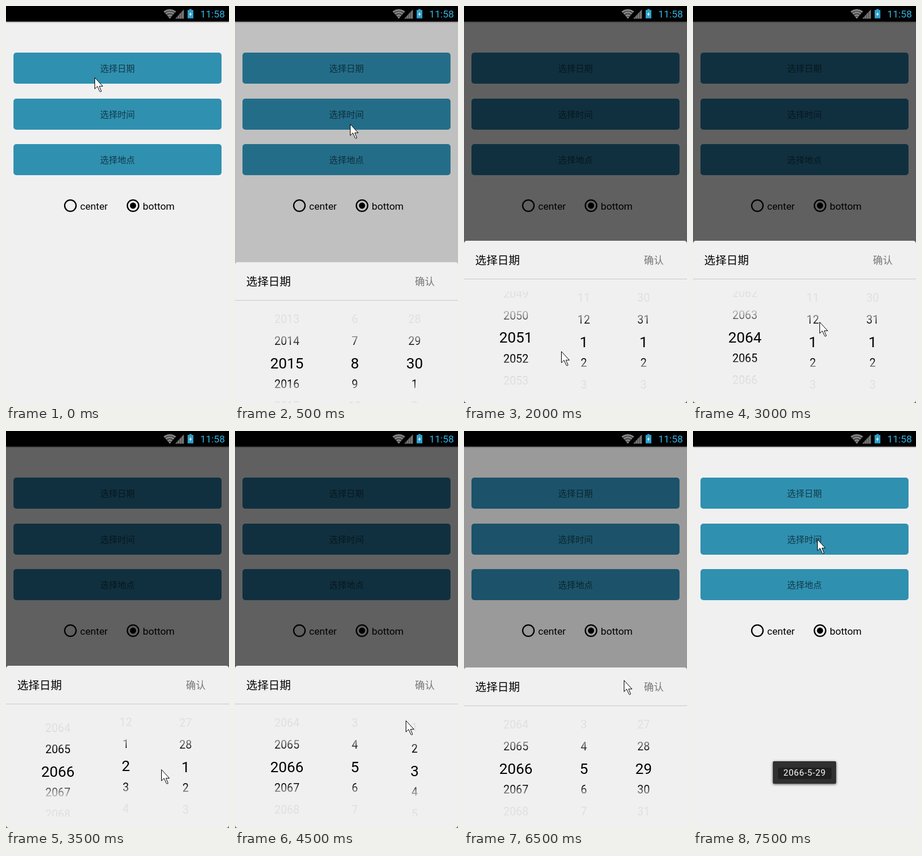
Recreate the animation shown at these times as an HTML page. Size 388 by 690 pixels, loop 8000 ms.

```html
<!DOCTYPE html>
<html lang="zh-CN">
<head>
<meta charset="utf-8">
<title>日期选择</title>
<style>
html, body { margin: 0; width: 100%; height: 100%; overflow: hidden; background: #f0f0f0; }
#stage { position: relative; width: 388px; height: 690px; overflow: hidden; background: #f0f0f0;
  font: 17.2px Roboto, sans-serif; color: #000; --dim: 0; }
#stage > *, #sheet > *, #wheels > *, .col > * { position: absolute; }
.cjk { font-family: "Noto Sans CJK SC", "Noto Sans CJK", sans-serif; white-space: nowrap; }
.button { left: 13px; width: 362px; height: 54px; border-radius: 5px; color: #103a48;
  background: rgb(calc(48 - 13 * var(--dim)), calc(144 - 40 * var(--dim)), calc(176 - 27 * var(--dim)));
  font-size: 15.1px; line-height: 52px; text-align: center; }
.label { line-height: 20px; top: 338px; }
#dim { inset: 0; background: #000; opacity: var(--dim); }
#bar { left: 0; top: 0; width: 388px; height: 27px; background: #000; box-shadow: 0 1px 2px #0008; }
#clock { left: 338px; top: 4px; line-height: 20px; color: #33b5e5; }
#sheet { left: 0; top: 408px; width: 388px; height: 282px; border-radius: 5px; background: #f0f0f0; }
#title { left: 19.5px; top: 18px; font-size: 19.4px; line-height: 30px; }
#confirm { left: 313px; top: 18px; font-size: 17.2px; line-height: 30px; color: #777; }
#rule { left: 0; top: 66px; width: 388px; height: 1px; background: #c8c8c8; }
#wheels { left: 0; top: 87.5px; width: 388px; height: 174px; overflow: hidden;
  --fade: linear-gradient(#0001, #0001 24px, #0003 34px, #0008 45px, #000 57px,
    #000 117px, #0008 129px, #0003 140px, #0001 150px, #0001);
  -webkit-mask-image: var(--fade); mask-image: var(--fade); }
.col { top: 0; width: 80px; height: 174px; }
.col span { left: 0; width: 80px; line-height: 38px; text-align: center; font-size: 19.4px; }
.col .on { font-size: 25.9px; }
#toast { left: 139px; top: 574px; width: 109.5px; height: 38.5px; border-radius: 2px; background: #303030;
  box-shadow: 0 1px 4px #000a; color: #fff; }
#toast span { position: absolute; left: 9px; top: 11px; width: 92.5px; height: 20px; border-radius: 3px;
  background: #202020; font-size: 15.1px; line-height: 19px; letter-spacing: .7px; text-align: center; }
#cursor { left: 0; top: 0; }
</style>
</head>
<body>
<div id="stage">
  <div class="button cjk" style="top:81px">选择日期</div>
  <div class="button cjk" style="top:160.6px">选择时间</div>
  <div class="button cjk" style="top:240.2px">选择地点</div>
  <svg width="388" height="24" style="left:0;top:335px" fill="none" stroke="#000" stroke-width="2.3">
    <circle cx="112" cy="12" r="9.9"/>
    <circle cx="221" cy="12" r="9.9"/>
    <circle cx="221" cy="12" r="5.4" fill="#000" stroke="none"/>
  </svg>
  <span class="label" style="left:129px">center</span>
  <span class="label" style="left:238px">bottom</span>
  <div id="dim"></div>
  <div id="bar"></div>
  <svg width="60" height="20" style="left:272px;top:4px" fill="none">
    <path d="M2 5.6Q13 -2 24 5.6L13 18Z" fill="#484848"/>
    <path d="M3 6.2Q13 -.6 23 6.2M6.2 9.6Q13 4.4 19.8 9.6M9.4 13.2Q13 10.4 16.6 13.2" stroke="#8c8c8c" stroke-width="2.4"/>
    <path d="M10.8 15.4Q13 13.8 15.2 15.4L13 18Z" fill="#8c8c8c"/>
    <path d="M22.5 18H37.5V2Z" fill="#777"/>
    <path d="M26.5 18V13M30 18V9M33.6 18V6" stroke="#444"/>
    <path d="M47 1.3H51V3H54V17.5H44V3H47Z" fill="#2f9fc9"/>
    <path d="M50 6.2L46.4 11H48.6L47.8 14.6L51.6 9.6H49.4Z" fill="#e8f4f8"/>
  </svg>
  <span id="clock">11:58</span>
  <div id="sheet">
    <span id="title" class="cjk">选择日期</span>
    <span id="confirm" class="cjk">确认</span>
    <div id="rule"></div>
    <div id="wheels">
      <div class="col" style="left:50.3px"></div>
      <div class="col" style="left:168.5px"></div>
      <div class="col" style="left:272.5px"></div>
    </div>
  </div>
  <div id="toast"><span>2066-5-29</span></div>
  <svg id="cursor" width="16" height="27">
    <path d="M.5.5V20L5 15.6L9.2 24.6Q10.2 26 12 24.2L8.3 15.4H14.3Z" fill="#fff" stroke="#000" stroke-linejoin="round"/>
  </svg>
</div>
<script>
// The screen is sampled twice a second; between samples the picture is held.
const STEP = 500, LOOP = 8000, ROW = 37.6, MID = 87.5, SHEET = 282;
const $ = id => document.getElementById(id);
const cols = [...document.querySelectorAll('.col')];
const clamp = u => Math.min(1, Math.max(0, u));
const span = (t, from, to) => clamp((t - from) / (to - from));

// Turning points of the pointer: seconds, x, y
const path = [
  [0, 154, 124], [.5, 200, 205], [1, 169, 552], [1.5, 169, 460], [2, 169, 600], [3, 220, 549],
  [4, 319, 626], [4.5, 297, 503], [5, 319, 613], [5.5, 326, 501], [6, 335, 447], [7, 221, 419], [7.5, 216, 188]
];

function pointer(t) {
  const i = path.findLastIndex(p => p[0] <= t);
  const [t0, x0, y0] = path[i], [t1, x1, y1] = path[i + 1] || path[i];
  const u = t1 > t0 ? span(t, t0, t1) : 0;
  return [x0 + (x1 - x0) * u, y0 + (y1 - y0) * u];
}

// Wheel positions in rows
const year = t => 2015 + 51 * (1 - (1 - span(t, 1, 4)) ** 3.05);
function month(t) {
  const u = span(t, 3, 4.5);
  return t < 2 ? 8 : 1 + 4 * u * u * (3 - 2 * u);
}
function day(t) {
  if (t < 2) return 30;
  const pos = 1 + 28.37 * span(t, 4, 6) ** 1.985;
  return t > 6 ? Math.round(pos) : pos;
}
const monthLength = t => t < 2 ? 30 : new Date(Math.round(year(t)), Math.round(month(t)), 0).getDate();

for (const col of cols)
  for (let k = -3; k <= 3; k++) {
    const row = document.createElement('span');
    if (!k) row.className = 'on';
    col.append(row);
  }

function turn(col, pos, max = Infinity) {
  const value = Math.round(pos);
  [...col.children].forEach((row, i) => {
    const n = value + i - 3;
    row.textContent = max < Infinity ? (n - 1 + max) % max + 1 : n;
    row.style.top = MID - 18.4 + (n - pos) * ROW + 'px';
  });
}

function draw(t) {
  const open = Math.min(span(t, .4, .7), 1 - span(t, 6.38, 6.68));
  $('sheet').style.transform = `translateY(${SHEET * (1 - open) ** 5}px)`;
  $('sheet').style.visibility = open ? 'visible' : 'hidden';
  $('stage').style.setProperty('--dim', .6 * open);
  $('toast').style.visibility = t >= 7 ? 'visible' : 'hidden';
  const [x, y] = pointer(t);
  $('cursor').style.transform = `translate(${Math.round(x)}px, ${Math.round(y)}px)`;
  turn(cols[0], year(t));
  turn(cols[1], month(t), 12);
  turn(cols[2], day(t), monthLength(t));
}

let shown = -1;
const start = performance.now();
function tick() {
  const step = Math.floor((performance.now() - start) % LOOP / STEP);
  if (step !== shown) draw((shown = step) * STEP / 1000);
  requestAnimationFrame(tick);
}
tick();
</script>
</body>
</html>
```
